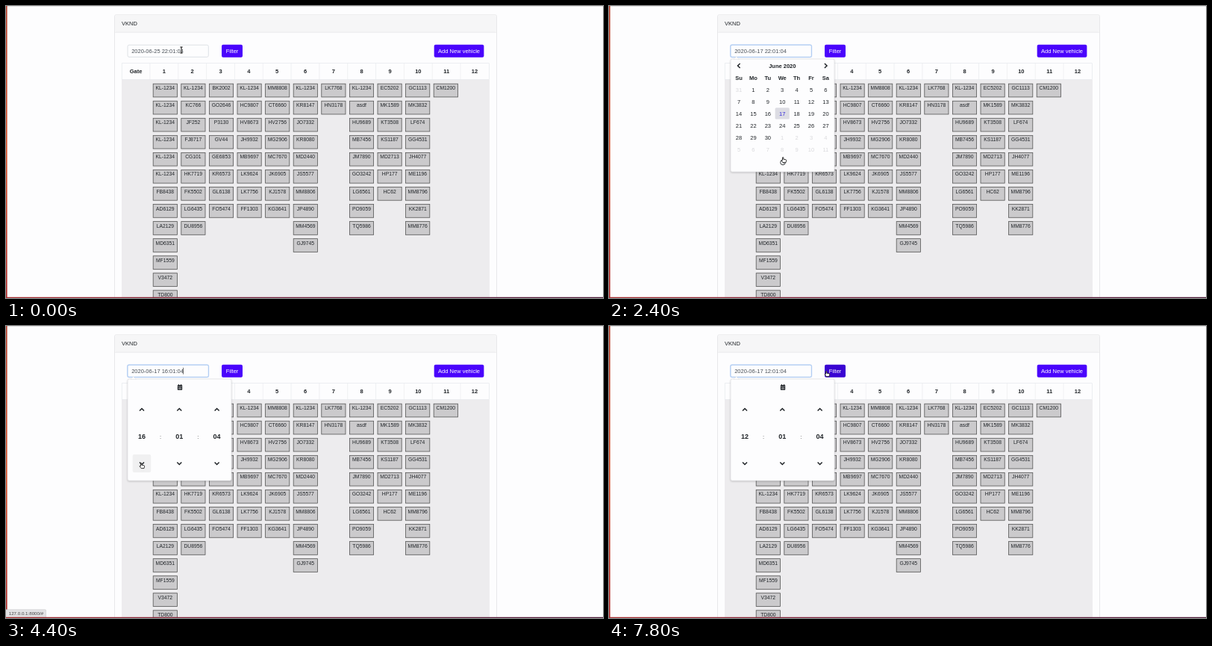
These frames come from a looping animation (800x391 px, 8 s). An HTML page:

```html
<!DOCTYPE html>
<html lang="en">
<head>
<meta charset="utf-8">
<title>Vehicle gates</title>
<style>
  html, body { margin: 0; width: 100%; height: 100%; overflow: hidden; background: #fdfdfe; }
  svg { display: block; width: 100vw; height: 100vh; font-family: "Liberation Sans", Arial, sans-serif; }
</style>
</head>
<body>
<svg viewBox="0 0 800 391">
  <defs>
    <linearGradient id="left" x2="0" y2="1"><stop stop-color="#b8432f"/><stop offset=".5" stop-color="#d9532c"/><stop offset="1" stop-color="#b02c2c"/></linearGradient>
    <linearGradient id="bottom"><stop stop-color="#a82d30"/><stop offset=".4" stop-color="#7a2340"/><stop offset="1" stop-color="#4d1a38"/></linearGradient>
    <filter id="soft" x="-10%" y="-10%" width="120%" height="125%"><feDropShadow dx="0" dy="1" stdDeviation="1.2" flood-opacity=".22"/></filter>
  </defs>
  <g id="page"></g>
  <g id="live"></g>
</svg>
<script>
const LOOP = 8000, STEP = 200;
const INK = '#212529', INDIGO = '#4a04fc';

const columns = [
  'KL-1234 KL-1234 KL-1234 KL-1234 KL-1234 KL-1234 FB8438 AD6129 LA2129 MD6351 MF1559 V3472 TD800',
  'KL-1234 KC766 JF252 FJ8717 CG101 HK7719 FK5502 LG6435 DU8956',
  'BK2002 GO2646 P3130 GV44 GE6853 KR6573 GL6138 FO5474',
  'KL-1234 HC9807 HV8673 JH9932 MB9697 LK9624 LK7756 FF1303',
  'MM8808 CT6660 HV2756 MG2906 MC7670 JK6905 KJ1578 KG3641',
  'KL-1234 KR8147 JO7332 KR8080 MD2440 JS5577 MM8806 JP4890 MM4569 GJ9745',
  'LK7768 HN3178',
  'KL-1234 asdf HU9689 MB7456 JM7890 GO3242 LG6561 PO9059 TQ5986',
  'EC5202 MK1589 KT3508 KS1187 MD2713 HP177 HC62',
  'GC1113 MK3832 LF674 GG4531 JH4077 ME1196 MM8796 KK2871 MM8776',
  'CM1200'
];

// Pointer stops: time, x, y, shape
const stops = [
  [0, 235, 59, 'beam'], [400, 235, 59, 'beam'], [600, 235, 100, 'hand'], [800, 234, 208, 'hand'],
  [1000, 234, 208, 'hand'], [1400, 235, 146, 'hand'], [2000, 235, 146, 'hand'], [2400, 234, 206, 'hand'],
  [2600, 234, 206, 'arrow'], [3000, 193, 164, 'arrow'], [3200, 182, 187, 'hand'], [5800, 182, 187, 'arrow'],
  [6600, 182, 131, 'arrow'], [6800, 182, 114, 'hand'], [7200, 182, 114, 'arrow'], [7800, 292, 64, 'hand']
];
const FOCUS = 200, PICK_DAY = 1800, SHOW_TIME = 2600, FIRST_DOWN = 3400, LAST_DOWN = 5400, UP = 7000;

const within = (t, from, to) => t >= from && t < to;

function text(s, x, y, { size = 7.5, fill = INK, anchor = 'middle', bold = false } = {}) {
  return `<text x="${x}" y="${y + size * .355}" font-size="${size}" fill="${fill}" text-anchor="${anchor}"${bold ? ' font-weight="700"' : ''}>${s}</text>`;
}
function rect(x, y, w, h, fill, stroke = 'none', r = 0, extra = '') {
  return `<rect x="${x}" y="${y}" width="${w}" height="${h}" rx="${r}" fill="${fill}" stroke="${stroke}" ${extra}/>`;
}
function line(d, width = 1.4, color = INK) {
  return `<path d="${d}" fill="none" stroke="${color}" stroke-width="${width}"/>`;
}
function button(label, x, w, fill = INDIGO) {
  return rect(x, 51.7, w, 17, fill, 'none', 2) + text(label, x + w / 2, 60, { fill: '#fff' });
}
function chevron(x, y, angle) {
  return `<g transform="translate(${x} ${y}) rotate(${angle})">${line('M-3 1.6L0 -1.5L3 1.6', 1.5)}</g>`;
}

function page() {
  let out = rect(145.5, 11.8, 512, 400, '#fdfdfe', '#dfdfe1', 2, 'stroke-width=".7"')
    + rect(146, 12.2, 511, 22.8, '#f6f6f7', 'none', 2)
    + line('M145.5 35.2H657.5', .6, '#dfdfe1')
    + text('VKND', 155, 23.5, { anchor: 'start' })
    + button('Add New vehicle', 573.7, 66.7)
    + rect(155, 98.5, 493, 300, '#edecee')
    + rect(155.2, 76.7, 492.4, 21.8, '#fdfdfe', '#e2e5e9', 0, 'stroke-width=".6"');
  for (let i = 0; i <= 12; i++) {
    const x = 174 + 37.83 * i;
    out += text(i || 'Gate', x, 87.8, { bold: true });
    if (i) out += line(`M${x - 18.9} 76.7V98.5`, .5, '#e2e5e9');
  }
  columns.forEach((column, c) => column.split(' ').forEach((plate, r) => {
    const x = 197.2 + 37.6 * c, y = 104.2 + 23.05 * r;
    out += rect(x, y, 32.2, 17.7, '#cbcacc', '#555', 0, 'stroke-width=".8"')
      + text(plate, x + 16.1, y + 5.6, { size: 6.77 });
  }));
  return out + rect(0, 0, 800, .8, '#dededf') + rect(0, 0, 1.6, 391, 'url(#left)');
}

function popup(height) {
  return rect(163, 71, 139, height, '#fdfdfe', '#d3d3d5', 2, 'stroke-width=".5" filter="url(#soft)"')
    + '<path d="M167 71.3L170.7 67.8L174.4 71.3Z" fill="#fdfdfe" stroke="#d8d8da" stroke-width=".4"/>';
}

function datePicker(selected) {
  let out = popup(151) + chevron(174, 80, -90) + chevron(290.5, 80, 90) + text('June 2020', 232.3, 80, { bold: true });
  const columnX = i => 174 + 19.4 * i;
  'Su Mo Tu We Th Fr Sa'.split(' ').forEach((d, i) => out += text(d, columnX(i), 96, { bold: true }));
  for (let i = 0; i < 42; i++) {
    const x = columnX(i % 7), y = 112 + 16 * Math.floor(i / 7);
    const active = i === selected, other = i < 1 || i > 30;
    if (active) out += rect(x - 9.6, y - 7.8, 19.2, 15.4, '#dcdce3', 'none', 1.5);
    out += text(i < 1 ? 31 : i > 30 ? i - 30 : i, x, y, { fill: active ? '#3428d8' : other ? '#d9d9dc' : INK });
  }
  return out + `<circle cx="233" cy="209.5" r="3.3" fill="none" stroke="${INK}" stroke-width=".9"/>` + line('M233 207.3V209.7L234.5 210.7', .8);
}

function timePicker(hour, hoverY) {
  let out = popup(136);
  if (hoverY) out += rect(169.7, hoverY - 12, 24.5, 24, '#f0f0f1', 'none', 2);
  out += rect(229.8, 79, 6.4, 6.8, INK, 'none', .7) + line('M231.4 78V80M234.6 78V80', 1)
    + line('M229.8 80.9H236.2M230.5 83.4H235.5M232.1 81.4V85.2M233.9 81.4V85.2', .4, '#fff');
  [hour, '01', '04'].forEach((value, i) => {
    const x = 182 + 50.3 * i;
    out += chevron(x, 112, 0) + chevron(x, 184, 180) + text(value, x, 148, { size: 9, bold: true });
    if (i) out += text(':', x - 25.2, 148, { fill: '#444' });
  });
  return out;
}

const shapes = {
  beam: line('M-1.6 -4H1.6M0 -4V4M-1.6 4H1.6', 2, '#fff') + line('M-1.6 -4H1.6M0 -4V4M-1.6 4H1.6', 1.1, '#111'),
  arrow: '<path d="M0 0V7.4L1.8 5.9L3 8.5L4.2 8L3.1 5.4H5.3Z" fill="#fff" stroke="#222" stroke-width=".8"/>',
  hand: '<path d="M-1.5 -3.2Q-.8 -4 -.2 -3.2V-.8L3 -.3Q3.8 0 3.6 1.2L3 3.6H-.8L-3 .8Q-3 -.1 -1.5 .5Z" fill="#fff" stroke="#222" stroke-width=".9"/>'
};

function pointer(t) {
  const next = stops.findIndex(s => s[0] > t);
  const a = next < 0 ? stops.at(-1) : stops[next - 1], b = next < 0 ? a : stops[next];
  const k = a === b ? 0 : (t - a[0]) / (b[0] - a[0]);
  const [x, y] = [1, 2].map(i => a[i] + (b[i] - a[i]) * k);
  return `<g transform="translate(${x} ${y})">${shapes[a[3]]}</g>`;
}

function hourAt(t) {
  if (t < FIRST_DOWN) return 22;
  if (t >= UP) return 12;
  return 21 - (Math.min(t, LAST_DOWN) - FIRST_DOWN) / STEP;
}

// The caret restarts its blink at each edit
function caretVisible(t) {
  if (t < FOCUS) return false;
  let edit = FOCUS;
  if (t >= PICK_DAY) edit = PICK_DAY;
  if (t >= FIRST_DOWN) edit = Math.min(t, LAST_DOWN);
  if (t >= UP) edit = UP;
  return (t - edit) % 1000 < 400;
}

function live(t) {
  const focused = t >= FOCUS, hour = hourAt(t), day = t < PICK_DAY ? 25 : 17;
  const hoverY = within(t, 3200, 6000) ? 184 : within(t, 6800, 7400) ? 112 : 0;
  const status = within(t, 800, 1200) || t === SHOW_TIME || within(t, 3400, 7600);
  let out = button('Filter', 289, 28, t >= 7800 ? '#3a04d2' : INDIGO);
  if (focused) out += rect(162, 51.2, 110.2, 18, '#cfe0f8', 'none', 2.6);
  out += rect(163, 52.2, 108.3, 16.1, '#fdfdfe', focused ? '#91b8ec' : '#d2d6dc', 2, 'stroke-width=".7"')
    + text(`2020-06-${day} ${hour}:01:04`, 168.2, 60, { anchor: 'start', fill: '#495057' });
  if (caretVisible(t)) out += rect(237.3, 55.8, .7, 8.8, '#333');
  if (focused) out += t < SHOW_TIME ? datePicker(day) : timePicker(hour, hoverY);
  if (status) out += rect(-1, 379.7, 54.5, 12, '#e2e2e4', '#c4c4c7', 1, 'stroke-width=".5"')
    + text('127.0.0.1:8000/#', 3.7, 385.2, { size: 6.2, anchor: 'start', fill: '#444' });
  return out + rect(0, 389.8, 800, 1.2, 'url(#bottom)') + pointer(t);
}

const liveLayer = document.getElementById('live');
document.getElementById('page').innerHTML = page();

let shown = -1;
const start = performance.now();
function frame() {
  const t = Math.floor((performance.now() - start) % LOOP / STEP) * STEP;
  if (t !== shown) liveLayer.innerHTML = live(shown = t);
  requestAnimationFrame(frame);
}
frame();
</script>
</body>
</html>
```
